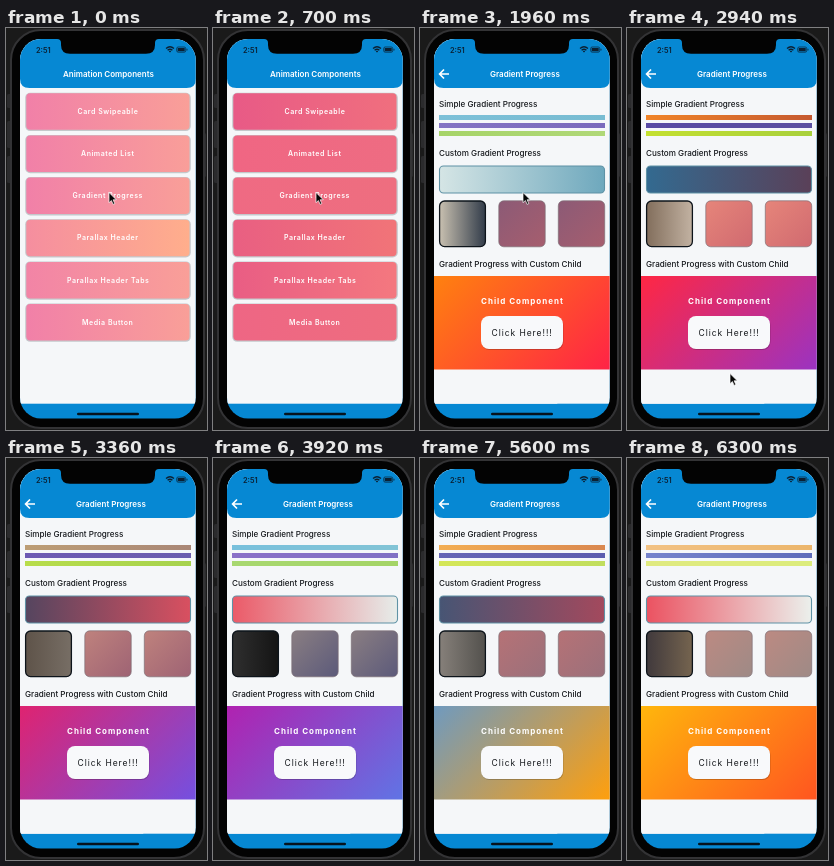
Animation of 201x402 px, one loop 6.44 s. Source, as an HTML page:

```html
<!DOCTYPE html>
<html lang="en">
<head>
<meta charset="utf-8">
<title>Gradient components</title>
<style>
html, body { margin: 0; width: 100%; height: 100%; overflow: hidden; background: #1a1a1a; }
svg { display: block; width: 100vw; height: 100vh; }
text { font-family: Inter, "Open Sans", sans-serif; font-size: 8px; fill: #fff; white-space: pre; }
.title { font-weight: 600; }
.head { font-size: 8.1px; font-weight: 500; fill: #15181c; }
.label { font-size: 7px; font-weight: 600; letter-spacing: .55px; }
.child { font-weight: 700; letter-spacing: 1px; }
.click { font-size: 8.5px; letter-spacing: .95px; fill: #15181c; }
.clock { font-size: 7.4px; font-weight: 600; fill: #0b2033; }
</style>
</head>
<body>
<svg viewBox="0 0 201 402" xmlns="http://www.w3.org/2000/svg">
  <defs>
    <clipPath id="screen"><rect x="14" y="11" width="175.7" height="379.5" rx="21"/></clipPath>
    <linearGradient id="edge"><stop stop-color="#000" stop-opacity="0"/><stop offset="1" stop-color="#000" stop-opacity=".16"/></linearGradient>
    <g id="base">
      <rect x="14" y="11" width="176" height="364.7" fill="#f5f7f9"/>
      <path d="M14 11H190V50.5Q190 60 180.5 60H23.5Q14 60 14 50.5Z" fill="#0688d3"/>
    </g>
  </defs>

  <rect width="201" height="402" fill="#1a1a1a"/>
  <g fill="#2b2b2d">
    <rect x="1" y="66" width="5" height="14" rx="1.5"/>
    <rect x="1" y="93" width="5" height="27" rx="1.5"/>
    <rect x="1" y="128" width="5" height="27" rx="1.5"/>
    <rect x="196" y="105" width="4" height="44" rx="1.5"/>
  </g>
  <rect x="5" y="2" width="193" height="398" rx="30" fill="#030303" stroke="#333335" stroke-width="2"/>

  <g clip-path="url(#screen)">
    <rect x="14" y="11" width="176" height="380" fill="#0688d3"/>
    <g id="list">
      <use href="#base"/>
      <text class="title" x="57" y="48.8">Animation Components</text>
    </g>
    <g id="detail">
      <rect x="9" y="60" width="5" height="315.7" fill="url(#edge)"/>
      <use href="#base"/>
      <path d="M29 46H20M24 41.5L19.6 46L24 50.5" fill="none" stroke="#fff" stroke-width="1.7"/>
      <text class="title" x="70" y="48.8">Gradient Progress</text>
      <text class="head" x="19" y="79">Simple Gradient Progress</text>
      <text class="head" x="19" y="128">Custom Gradient Progress</text>
      <text class="head" x="19" y="238.5">Gradient Progress with Custom Child</text>
      <g id="boxes"></g>
      <text class="child" x="61" y="276">Child Component</text>
      <rect x="61.5" y="289" width="82" height="33" rx="8" fill="#000" opacity=".2"/>
      <rect x="61" y="288" width="82" height="33" rx="8" fill="#f8f9fb"/>
      <text class="click" x="71.5" y="307.5">Click Here!!!</text>
    </g>
    <text class="clock" x="30" y="24.6">2:51</text>
    <g fill="none" stroke="#0b2033">
      <path d="M160 20.5Q164 17 168 20.5M161.6 22.3Q164 20.2 166.4 22.3" stroke-width="1.3"/>
      <rect x="170.7" y="19" width="9" height="5.2" rx="1.5" stroke-width=".7"/>
    </g>
    <path d="M162.8 23.4L164 22.6L165.2 23.4L164 24.6ZM171.7 20H178.7V23.2H171.7ZM180.6 20.7H181.4V22.5H180.6Z" fill="#0b2033"/>
    <path d="M51 10V11Q55 11 55 15V17Q55 25.7 64 25.7H140Q149 25.7 149 17V15Q149 11 153 11V10Z" fill="#030303"/>
    <rect x="71" y="384.8" width="62" height="2.4" rx="1.2" fill="#06131d"/>
  </g>
  <path id="cursor" d="M0 0V10.2L2.4 8L4.1 11.9L5.8 11.1L4.1 7.3H7.3Z" fill="#050505" stroke="#fff" stroke-width=".7"/>
</svg>
<script>
const LOOP = 6440, STEP = 140, WIDTH = 175.7;
const NS = "http://www.w3.org/2000/svg";
const $ = id => document.getElementById(id);
const defs = document.querySelector("defs");
const clamp = u => Math.min(1, Math.max(0, u));
const smooth = u => u * u * (3 - 2 * u);
const rgb = hex => [0, 2, 4].map(i => parseInt(hex.substr(i, 2), 16));
const blend = (a, b, u) => {
  const p = rgb(a), q = rgb(b);
  return `rgb(${p.map((v, i) => Math.round(v + (q[i] - v) * u))})`;
};

function add(parent, tag, attrs, text) {
  const el = document.createElementNS(NS, tag);
  for (const k in attrs) el.setAttribute(k, attrs[k]);
  if (text) el.textContent = text;
  return parent.appendChild(el);
}

let count = 0;
// Adds a rectangle with a two-stop gradient and returns a setter for its colours.
function gradBox(parent, x, y, width, height, rx, extra = {}, diagonal = false) {
  const id = "g" + count++;
  const reach = diagonal ? (width + height) / 2 : width;
  const grad = add(defs, "linearGradient", {
    id, gradientUnits: "userSpaceOnUse",
    x1: x, y1: y, x2: x + reach, y2: diagonal ? y + reach : y
  });
  const stops = [0, 1].map(offset => add(grad, "stop", { offset }));
  add(parent, "rect", { x, y, width, height, rx, fill: `url(#${id})`, ...extra });
  return colours => stops.forEach((s, i) => s.setAttribute("stop-color", colours[i]));
}

// Segment index and fraction of t among ascending times.
function locate(times, t) {
  let i = 0;
  while (i < times.length - 2 && t >= times[i + 1]) i++;
  return [i, clamp((t - times[i]) / (times[i + 1] - times[i]))];
}
const keyed = (times, vals, t) => {
  const [i, u] = locate(times, t);
  return vals[i] + (vals[i + 1] - vals[i]) * u;
};
const KEYS = [1400, 1960, 2940, 3920, 4900, 6300];

// Colour pairs "left right" blended from key to key.
const pairs = (list, times = KEYS) => {
  const keys = list.map(s => s.split(" "));
  return t => {
    const [i, u] = locate(times, t);
    return [0, 1].map(k => blend(keys[i][k], keys[i + 1][k], u));
  };
};

// A gradient window travelling along a cyclic palette.
const cycle = (palette, phases, span) => {
  const pal = palette.split(" "), n = pal.length;
  const pick = p => blend(pal[Math.floor(p) % n], pal[(Math.floor(p) + 1) % n], p % 1);
  return t => {
    const p = keyed(KEYS, phases, t);
    return [pick(p), pick(p + span)];
  };
};

const rows = [
  ["Card Swipeable", 71.5, "f180a8 f99f98", "df3464 e63e64"],
  ["Animated List", 75, "f180a8 f99e99", "ee4c5e e2396a"],
  ["Gradient Progress", 66.5, "f180a8 f99f98", "ec535e e33d66"],
  ["Parallax Header", 71, "f58e9f ffae8c", "dd3064 e23963"],
  ["Parallax Header Tabs", 61, "f284a6 f99f98", "e03562 ee5065"],
  ["Media Button", 76, "f180a8 f99f98", "ea4b60 e23a66"]
];

const anims = rows.map(([label, x, from, to], i) => {
  const y = 65.3 + i * 42.15;
  add($("list"), "rect", { x: 19.2, y: y - .5, width: 165.6, height: 38.3, rx: 5, fill: "#b4b9bc", opacity: .75 });
  const set = gradBox($("list"), 20.3, y, 163.2, 36.5, 4);
  add($("list"), "text", { class: "label", x, y: y + 20.7 }, label);
  return [set, pairs([from, to], [0, 1400])];
});

const boxes = $("boxes");
const bars = [
  ["2684bd 2684b0", "7cc0d8 78bcd2", "f08428 c65a30", "78c0dc 82c4d6", "f39a22 c85a34", "f2c284 ecb66c"],
  ["5a4aa2 6250a8", "8474c4 7a6abc", "584aa4 5c50a0", "8a70c8 8070c4", "5548a0 5a4ca2", "7684cc 5e6cba"],
  ["8cc34a 8cc34a", "a6d468 b0d878", "c4e030 a8d03c", "a8d870 a4d466", "cae430 a6d040", "e0ea80 dcec7c"]
];
bars.forEach((keys, i) => anims.push([gradBox(boxes, 19, 87 + i * 8, 166, 5, 0), pairs(keys)]));

anims.push([
  gradBox(boxes, 19.5, 138, 165, 27, 4, { stroke: "#5f92a5", "stroke-width": 1.1 }),
  cycle("eb5261 ebf0ec 7db8c8 336a90 5a4058", [0, 1.2, 3, 5.05, 7, 10], 1)
]);
anims.push([
  gradBox(boxes, 19.6, 173, 45.8, 45.6, 5, { stroke: "#0d141b", "stroke-width": 1.3 }),
  pairs(["363636 171717", "c8c0b0 323c4a", "826e5c c2b2a2", "2f2f2f 141414", "ccc6b8 303d4b", "40393c 75644f"])
]);
for (const x of [78.8, 138.3]) anims.push([
  gradBox(boxes, x, 172.8, 46.4, 46, 5, { stroke: "#7d7078", "stroke-width": .7 }, true),
  pairs(["485878 505a78", "8c5a76 a65e6e", "e6857a d06a70", "8a7e82 5c5a7a", "b05a6a 96566f", "bc8a82 9e8a86"])
]);
anims.push([
  gradBox(boxes, 14, 248, 176, 93.5, 0, {}, true),
  cycle("ffb60c ff6a10 ff2346 b022b0 5a64f5 6f9abf", [0, .7, 1.95, 3, 4, 6], 1.3)
]);

const slide = (el, x) => el.setAttribute("transform", `translate(${x.toFixed(2)} 0)`);
const show = (el, on) => el.setAttribute("visibility", on ? "visible" : "hidden");

function draw(time) {
  const t = Math.floor((time % LOOP) / STEP) * STEP;
  anims.forEach(([set, colours]) => set(colours(t)));

  const push = smooth(clamp((t - 1150) / 560));
  slide($("list"), -.3 * WIDTH * push);
  slide($("detail"), WIDTH * (1 - push));
  show($("detail"), push > 0);

  const drop = 181 * smooth(clamp((t - 2240) / 560));
  $("cursor").setAttribute("transform", `translate(103 ${164.5 + drop})`);
  show($("cursor"), t < 3360);
}

function tick() {
  draw(performance.now());
  requestAnimationFrame(tick);
}
tick();
</script>
</body>
</html>
```
